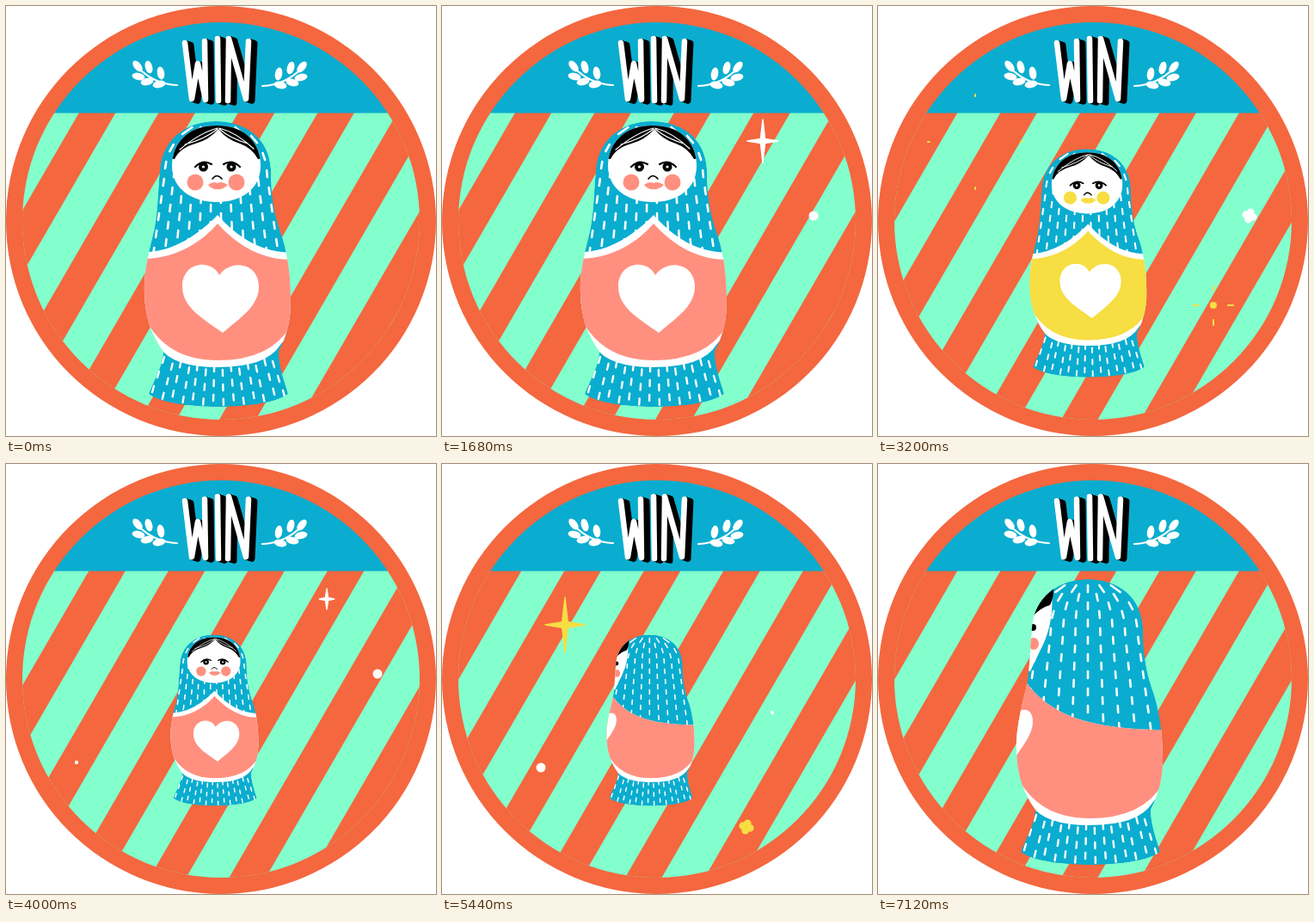
These frames come from a looping animation (500 px wide and 500 px high, 7.2 s). An HTML page with a canvas:

```html
<!DOCTYPE html>
<html lang="en">
<head>
<meta charset="utf-8">
<title>Win</title>
<style>
html, body { margin: 0; width: 100%; height: 100%; overflow: hidden; background: #fff; }
canvas { display: block; width: 500px; height: 500px; }
</style>
</head>
<body>
<canvas id="stage" width="500" height="500"></canvas>
<script>
const ctx = document.getElementById('stage').getContext('2d');
const STEP = 80, STEPS = 90;
const ORANGE = '#f4673f', BLUE = '#0aadcf', MINT = '#83ffcd', CORAL = '#ff9080';
const YELLOW = '#f6de43', WHITE = '#fff', BLACK = '#000';
const PITCH = 92.5, STRIPE = 42.5, SLANT = 0.58, DRIFT = 11.5, BAND = 124.5;

const shapes = {
  doll: 'M244 134C279 134 306 154 308 190C308 221 312 244 321 268C329 294 331 320 331 345C331 366 326 385 317 402C317 419 324 437 328 451C304 471 189 471 166 451C171 437 182 420 183 402C170 384 162 364 161 335C160 318 163 297 170 270C177 244 176 222 179 190C182 155 209 134 244 134Z',
  band: 'M150 286C190 290 224 266 246 243C268 267 297 290 340 286L334 376L319 394Q303 420 246 420Q193 420 178 396L150 366Z',
  body: 'M150 293C194 298 228 274 246 253C265 274 297 299 340 294L334 366Q312 412 246 412Q187 412 162 364Z',
  face: 'M245 139C280 139 296 161 296 186C296 213 273 228 245 228C217 228 193 213 193 186C193 161 210 139 245 139Z',
  hair: 'M247 143Q236 156 220 160Q202 165 196 178L180 175L180 130L310 130L310 175L293 178Q286 165 272 160Q256 155 247 143Z',
  strands: 'M246 142Q226 147 202 167M246 143Q231 155 208 161M248 142Q268 147 288 166M248 143Q261 154 281 160',
  heart: 'M252 380C228 363 205 350 205 326C205 298 238 293 248 313C262 293 294 299 294 326C294 349 273 362 252 380Z',
  lips: 'M235 208Q241 203 246 206Q251 203 258 208Q252 214 246 213Q240 214 235 208Z',
  eyes: 'M220 187Q229 178 239 184M253 184Q263 178 272 187',
  lids: 'M219 186Q229 191 240 187M252 187Q262 191 273 186',
  nose: 'M240 201Q245 194 251 201',
  sideFace: 'M165 150L202 148Q205 183 191 212Q185 224 177 241L165 241Z',
  sideHair: 'M165 140H204Q205 155 200 164Q189 167 179 178L165 178Z',
  sideBand: 'M150 238L174 256C200 290 244 310 340 309L334 376L319 394Q303 420 246 420Q193 420 178 396L150 366Z',
  sideBody: 'M150 238L174 256C200 290 244 310 340 309L334 366Q312 412 246 412Q187 412 162 364Z',
  sideHeart: 'M150 300C163 282 180 280 180 300C180 314 168 328 161 339Z',
  backBand: 'M150 294Q240 334 340 299L334 376L319 394Q303 420 246 420Q193 420 178 396L150 366Z',
  backBody: 'M150 294Q240 334 340 299L334 366Q312 412 246 412Q187 412 162 364Z'
};
for (const name in shapes) shapes[name] = new Path2D(shapes[name]);

// x, y, colour, kind, first steps
const sparkles = [
  [82, 347, WHITE, 'star', [8, 22, 50]],
  [432, 244, WHITE, 'star', [10, 20, 38, 49]],
  [113, 158, YELLOW, 'burst', [9, 35, 51]],
  [390, 348, YELLOW, 'burst', [11, 39]],
  [373, 157, WHITE, 'star', [4, 17, 44]],
  [143, 187, YELLOW, 'star', [63, 73]],
  [115, 353, WHITE, 'star', [67, 79]],
  [384, 289, WHITE, 'star', [68, 78]],
  [354, 422, YELLOW, 'star', [66, 76]],
  [338, 173, YELLOW, 'star', [69, 79]]
];

function fill(path, color) {
  ctx.fillStyle = color;
  ctx.fill(path);
}

function stroke(path, color, width) {
  ctx.strokeStyle = color;
  ctx.lineWidth = width;
  ctx.stroke(path);
}

function dot(x, y, r, color, ry = r, turn = 0) {
  ctx.fillStyle = color;
  ctx.beginPath();
  ctx.ellipse(x, y, r, ry, turn, 0, Math.PI * 2);
  ctx.fill();
}

function line(points, color, width) {
  ctx.beginPath();
  points.forEach(([x, y]) => ctx.lineTo(x, y));
  ctx.strokeStyle = color;
  ctx.lineWidth = width;
  ctx.stroke();
}

function drawStripes(step) {
  const start = 85 - 4 * PITCH + (step % 7) * DRIFT;
  const shift = 376 * SLANT;
  ctx.fillStyle = MINT;
  ctx.fillRect(0, 124, 500, 376);
  ctx.fillStyle = ORANGE;
  for (let x = start; x < 800; x += PITCH) {
    ctx.beginPath();
    ctx.moveTo(x, 124);
    ctx.lineTo(x + STRIPE, 124);
    ctx.lineTo(x + STRIPE - shift, 500);
    ctx.lineTo(x - shift, 500);
    ctx.fill();
  }
}

function drawLaurel(flip) {
  ctx.save();
  if (flip) {
    ctx.translate(497, 1);
    ctx.scale(-1, 1);
  }
  stroke(new Path2D('M153 71Q172 91 199 92'), WHITE, 2);
  const leaves = [[153, 70, 0.9], [166, 71, 1.3], [154, 82, 0.2], [164, 88, -0.2], [180, 78, 1.4], [178, 91, -0.2]];
  leaves.forEach(([x, y, turn]) => dot(x, y, 7.5, WHITE, 4.2, turn));
  ctx.restore();
}

function drawTitle() {
  const letters = [
    [[208, 43], [216, 108], [223, 67], [232, 109], [231, 41]],
    [[246, 38], [247, 110]],
    [[258, 110], [259, 38], [279, 108], [282, 41]]
  ];
  for (let d = 8; d >= 0; d--) {
    ctx.save();
    ctx.translate(d * 0.9, d * 0.3);
    letters.forEach(points => line(points, d ? BLACK : WHITE, 6.5));
    ctx.restore();
  }
}

// Horizontal distance from the doll's axis to the edge of the hood.
function hoodReach(y) {
  const rise = Math.max(0, (195 - y) / 61);
  return 66 * Math.sqrt(1 - rise * rise) + Math.max(0, y - 195) * 0.16;
}

function drawHoodDashes(front) {
  const columns = front ? 12 : 9;
  for (let col = 0; col < columns; col++) {
    const u = ((col + 0.5) / columns * 2 - 1) * 0.98;
    for (let y = 141 + (col % 2) * 10; y < 320; y += 20) {
      line([[244 + u * hoodReach(y), y], [244 + u * hoodReach(y + 8), y + 8]], WHITE, 2.6);
    }
  }
}

function drawBaseDashes() {
  for (let col = 0; col < 14; col++) {
    const u = (col - 6.5) / 6.5;
    for (let row = 0; row < 3; row++) {
      const x = 247 + u * (63 + row * 6);
      const y = 408 + row * 17 + 10 * (1 - u * u) + (col % 2) * 5;
      line([[x, y], [x + 2 * u, y + 7]], WHITE, 2.4);
    }
  }
}

function drawFace(color, blink) {
  ctx.save();
  fill(shapes.face, WHITE);
  ctx.clip(shapes.face);
  fill(shapes.hair, BLACK);
  stroke(shapes.strands, WHITE, 1.2);
  ctx.restore();
  [220, 268].forEach(x => dot(x, 205, 9.5, color));
  if (blink) {
    stroke(shapes.lids, BLACK, 2);
  } else {
    stroke(shapes.eyes, BLACK, 2.2);
    [229.5, 262].forEach(x => {
      dot(x, 187, 5.5, BLACK);
      dot(x, 187, 1.6, WHITE);
    });
  }
  stroke(shapes.nose, BLACK, 1.6);
  fill(shapes.lips, color);
}

function drawDoll(size, pose, blink) {
  const color = size === 1 ? YELLOW : CORAL;
  const scale = 1 - 0.2 * size;
  const view = pose === 0 ? 'front' : pose === 1 || pose === 4 ? 'side' : 'back';
  ctx.save();
  ctx.translate(246 - 1.75 * size, 300 - size);
  ctx.scale(pose === 1 || pose === 2 ? -scale : scale, scale);
  ctx.translate(-246, -300);
  ctx.clip(shapes.doll);
  fill(shapes.doll, BLUE);
  drawHoodDashes(view === 'front');
  if (view === 'front') {
    drawFace(color, blink);
    fill(shapes.band, WHITE);
    fill(shapes.body, color);
    fill(shapes.heart, WHITE);
  } else if (view === 'side') {
    fill(shapes.sideFace, WHITE);
    fill(shapes.sideHair, BLACK);
    dot(180, 190, 4, BLACK);
    dot(181, 209, 6, color, 7);
    fill(shapes.sideBand, WHITE);
    fill(shapes.sideBody, color);
    fill(shapes.sideHeart, WHITE);
  } else {
    fill(shapes.backBand, WHITE);
    fill(shapes.backBody, color);
  }
  drawBaseDashes();
  ctx.restore();
}

function drawStar(x, y, r, color) {
  const waist = Math.max(1.2, r * 0.08);
  ctx.fillStyle = color;
  ctx.beginPath();
  for (let i = 0; i < 8; i++) {
    const angle = i * Math.PI / 4;
    const reach = i % 2 ? waist * 1.8 : r;
    const wide = i % 4 === 0 ? 0.72 : 1;
    ctx.lineTo(x + Math.cos(angle) * reach * wide, y + Math.sin(angle) * reach);
  }
  ctx.closePath();
  ctx.fill();
  ctx.strokeStyle = color;
  ctx.lineWidth = 1.5;
  ctx.stroke();
}

function drawSparkle(x, y, color, kind, age) {
  if (kind === 'burst') {
    const radius = [2, 4, 7, 10, 6, 0][age];
    if (radius === undefined) return;
    dot(x, y, radius, color);
    if (!age) return;
    const near = 8 + age * 9, far = near + 7 - age;
    for (let i = 0; i < 4; i++) {
      const c = Math.cos(i * Math.PI / 2), s = Math.sin(i * Math.PI / 2);
      line([[x + c * near, y + s * near], [x + c * far, y + s * far]], color, 2);
    }
  } else if (age < 2) {
    dot(x, y, age ? 5.5 : 2.2, color);
  } else if (age === 2) {
    for (let i = 0; i < 4; i++) {
      const angle = i * Math.PI / 2 + 0.3;
      dot(x + 4.5 * Math.cos(angle), y + 4.5 * Math.sin(angle), 4.3, color);
    }
  } else if (age < 7) {
    drawStar(x, y, [14, 25, 32, 12][age - 3], color);
  } else {
    dot(x, y, 2, color);
  }
}

// Returns size index, turning pose and whether the eyes are shut.
function dollState(step) {
  const spin = Math.floor(step % 10 / 2);
  if (step < 20) return [0, 0, step >= 10 && step < 15];
  if (step < 30) return [0, spin];
  if (step < 40) return [1, 0, step >= 35 && step < 38];
  if (step < 50) return [1, spin];
  if (step < 60) return [2, 0, step >= 55 && step < 58];
  return [8 - Math.floor(step / 10), spin];
}

function draw(step) {
  ctx.fillStyle = WHITE;
  ctx.fillRect(0, 0, 500, 500);
  ctx.lineCap = ctx.lineJoin = 'round';
  dot(250, 250, 250, ORANGE);
  ctx.save();
  ctx.beginPath();
  ctx.arc(250, 250, 231, 0, Math.PI * 2);
  ctx.clip();
  drawStripes(step);
  ctx.fillStyle = BLUE;
  ctx.fillRect(0, 0, 500, BAND);
  ctx.restore();
  drawLaurel(false);
  drawLaurel(true);
  drawTitle();
  for (const [x, y, color, kind, starts] of sparkles) {
    for (const first of starts) {
      const age = step - first;
      if (age >= 0 && age < 8) drawSparkle(x, y, color, kind, age);
    }
  }
  drawDoll(...dollState(step));
}

const origin = performance.now();
function tick() {
  draw(Math.floor((performance.now() - origin) / STEP) % STEPS);
  requestAnimationFrame(tick);
}
tick();
</script>
</body>
</html>
```
